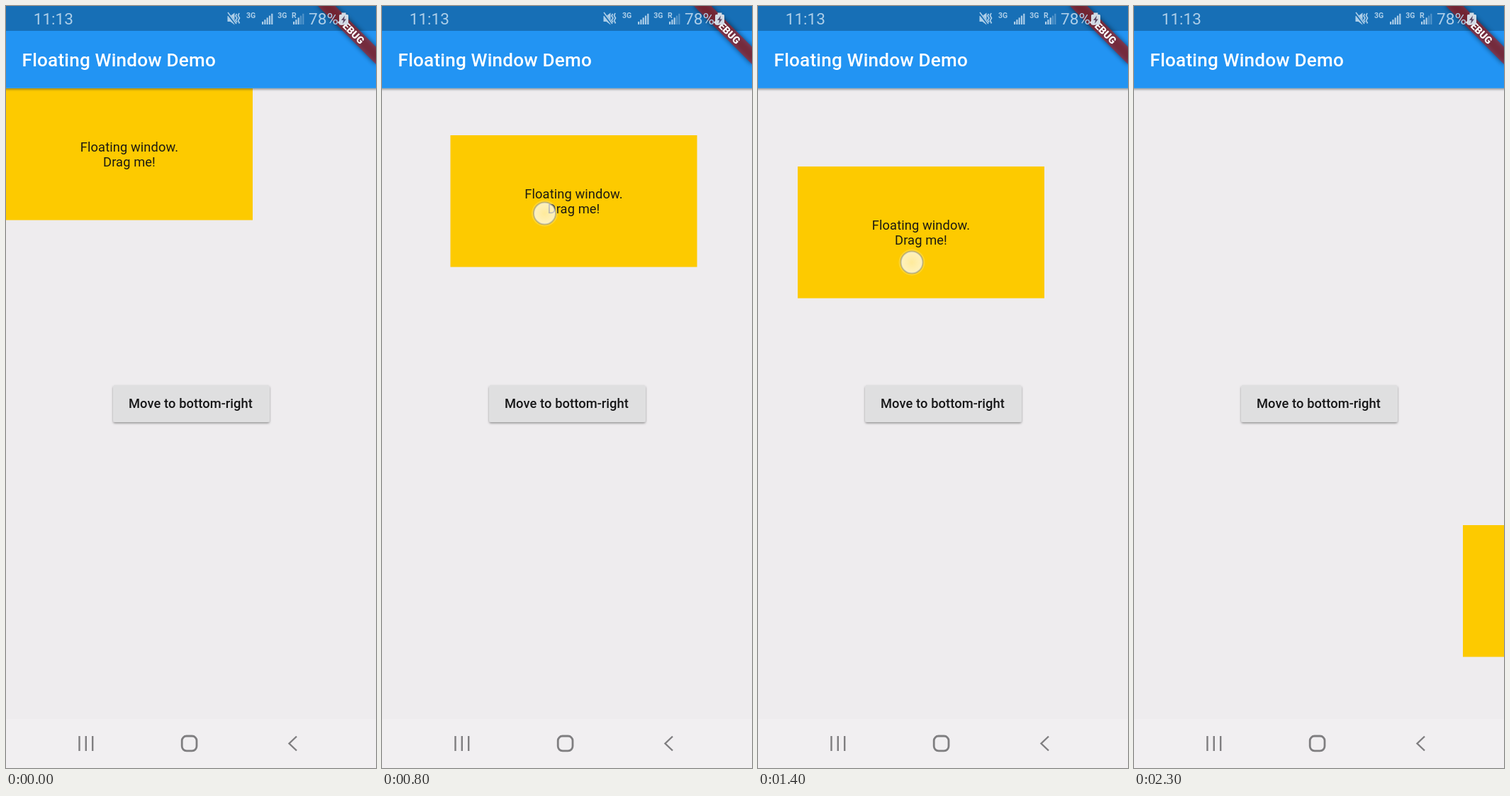
Animation of 522x1073 px, one loop 3100 ms. Source, as an HTML page:

```html
<!DOCTYPE html>
<html lang="en">
<head>
<meta charset="utf-8">
<title>Floating Window Demo</title>
<style>
html, body { margin: 0; width: 100%; height: 100%; overflow: hidden; background: #eeecee; }
svg { display: block; width: 100%; height: 100%; font-family: Roboto, "Noto Sans", sans-serif; }
.mid { text-anchor: middle; }
.body { font-size: 18.3px; letter-spacing: .1px; fill: #1d1b12; }
.button { font-weight: 500; fill: #161617; }
.title { font-size: 26.1px; font-weight: 500; letter-spacing: .2px; fill: #fff; }
.status { fill: #adcee8; font-size: 22.6px; }
.status .net { font-size: 10.5px; font-weight: 700; }
.debug { font-size: 14.2px; font-weight: 900; fill: #fff; }
.nav { fill: none; stroke: #7f7e80; stroke-width: 2.4; }
</style>
</head>
<body>
<svg viewBox="0 0 522 1073" preserveAspectRatio="none">
  <defs>
    <filter id="barShadow" x="-5%" y="-20%" width="110%" height="150%">
      <feDropShadow dx="0" dy="2" stdDeviation="1.8" flood-opacity=".35"/>
    </filter>
    <filter id="buttonShadow" x="-10%" y="-20%" width="120%" height="150%">
      <feDropShadow dx="0" dy="1.6" stdDeviation="1.4" flood-opacity=".38"/>
    </filter>
    <filter id="blur" x="-20%" y="-80%" width="140%" height="260%">
      <feGaussianBlur stdDeviation="3.5"/>
    </filter>
    <radialGradient id="dot">
      <stop offset="0" stop-color="#fff" stop-opacity=".52"/>
      <stop offset="1" stop-color="#fff" stop-opacity=".7"/>
    </radialGradient>
    <clipPath id="buttonClip"><rect x="151" y="534" width="221" height="52" rx="3"/></clipPath>
  </defs>

  <rect width="522" height="1073" fill="#eeecee"/>
  <rect y="1004" width="522" height="69" fill="#f1eff1"/>

  <rect x="151" y="534" width="221" height="52" rx="3" fill="#dfdfe0" filter="url(#buttonShadow)"/>
  <g clip-path="url(#buttonClip)"><circle id="ripple" cx="229" cy="578"/></g>
  <text class="body button mid" x="260.5" y="566">Move to bottom-right</text>

  <g id="win">
    <rect width="348" height="185.5" fill="#fdca00"/>
    <text class="body mid" x="174" y="88.5">Floating window.</text>
    <text class="body mid" x="174" y="110">Drag me!</text>
  </g>

  <rect x="-10" y="-10" width="542" height="125.7" fill="#2094f3" filter="url(#barShadow)"/>
  <rect width="522" height="35" fill="#176fb6"/>
  <text class="title" x="22.6" y="84.5">Floating Window Demo</text>

  <g transform="translate(522 0) rotate(45)">
    <rect x="-58" y="40.6" width="116" height="17.4" opacity=".55" filter="url(#blur)"/>
    <rect x="-58" y="40.6" width="116" height="17.4" fill="#b71c1c" opacity=".6"/>
    <text class="debug mid" y="54.4">DEBUG</text>
  </g>

  <g class="status">
    <text x="38.7" y="26">11:13</text>
    <path d="M312.500 14h4l6-4.500v17l-6-4.500h-4z"/>
    <path d="M312 9.500L325 26" fill="none" stroke="#176fb6" stroke-width="3.500"/>
    <path d="M313 9L325 25" fill="none" stroke="#adcee8" stroke-width="1.600"/>
    <path d="M325.500 11l-1.500 3 2 3-2 3 2 3M329 10l-1.500 3.500 2 3.500-2 3.500 2 4" fill="none" stroke="#adcee8" stroke-width="1.700"/>
    <text class="net" x="339" y="17">3G</text>
    <g id="bars1"></g>
    <text class="net" x="383.300" y="17">3G</text>
    <text class="net" x="403" y="16.500">R</text>
    <g id="bars2"></g>
    <text x="427" y="26">78%</text>
    <path d="M473.500 9.500h6v2.500h2q1.500 0 1.500 1.500v11.500q0 1.500-1.500 1.500h-10q-1.500 0-1.500-1.500v-11.500q0-1.500 1.500-1.500h2z" fill="#d3dbe5"/>
    <path d="M478 13.500l-5 6.500h3l-1 5 5-6.500h-3z" fill="#5b4764"/>
  </g>

  <g class="nav">
    <path d="M103.500 1028v21M112.800 1028v21M122.200 1028v21"/>
    <rect x="248.200" y="1028" width="20.800" height="20.800" rx="6.500" stroke-width="2.800"/>
    <path d="M410 1028.500l-10.500 10 10.500 10"/>
  </g>

  <g id="touch">
    <circle r="18.500" fill="#fff" opacity=".18"/>
    <circle r="15.500" fill="url(#dot)" stroke="#75808c" stroke-opacity=".45" stroke-width="2"/>
  </g>
</svg>
<script>
const $ = id => document.getElementById(id);
const LOOP = 3100, STEP = 100, LAST = 23, RELEASE = 18;
const GRIP = [157, 132];   // where the finger holds the window

// Drag path, one pose per step: window x, y and how far the finger runs ahead.
const drag = [
  [0, 116, 0, 0], [8, 130, 6, 8], [32, 164, 10, 8], [56, 187, 8, 1],
  [74, 205, -3, 4], [42, 222, -10, 2], [6, 223, -1, 1], [86, 228, 8, -6],
  [96.5, 182, -24, -22], [50, 147, -16, -6], [18, 148, -6, 5], [7, 165, -1, 4],
  [9.5, 178, .5, -1], [30, 203, 6, 6], [56, 226, 4, 3], [68, 235, 0, 0]
];
const rest = [68, 235], corner = [464, 731], tap = [229, 578];

function bars(id, x, faintFrom) {
  $(id).innerHTML = [0, 1, 2, 3, 4].map(i => {
    const h = 4 + i * 2.8;
    return `<rect x="${x + i * 3.3}" y="${26 - h}" width="2.2" height="${h}" opacity="${i < faintFrom ? 1 : .4}"/>`;
  }).join("");
}

function place(el, [x, y]) {
  el.setAttribute("transform", `translate(${x} ${y})`);
}

function windowAt(i) {
  if (i < drag.length) return drag[i];
  if (i <= RELEASE) return rest;
  const u = (i - RELEASE) / (LAST - RELEASE), k = 1 - (1 - u) ** 2;
  return rest.map((v, n) => v + (corner[n] - v) * k);
}

function fingerAt(i) {
  if (i > 0 && i < drag.length) {
    const [x, y, dx, dy] = drag[i];
    return [x + GRIP[0] + dx, y + GRIP[1] + dy];
  }
  return i === 17 || i === 18 ? tap : null;
}

function draw(now) {
  const i = Math.min(LAST, Math.floor(now % LOOP / STEP));
  place($("win"), windowAt(i));

  const finger = fingerAt(i);
  $("touch").style.display = finger ? "" : "none";
  if (finger) place($("touch"), finger);

  const age = i - 17;
  const on = age >= 0 && age < 5;
  $("ripple").setAttribute("r", on ? 24 + age * 45 : 0);
  $("ripple").setAttribute("opacity", on ? .13 - age * .027 : 0);
}

bars("bars1", 361, 5);
bars("bars2", 405, 3);

let start;
function tick(now) {
  start ??= now;
  draw(now - start);
  requestAnimationFrame(tick);
}
draw(0);
requestAnimationFrame(tick);
</script>
</body>
</html>
```
